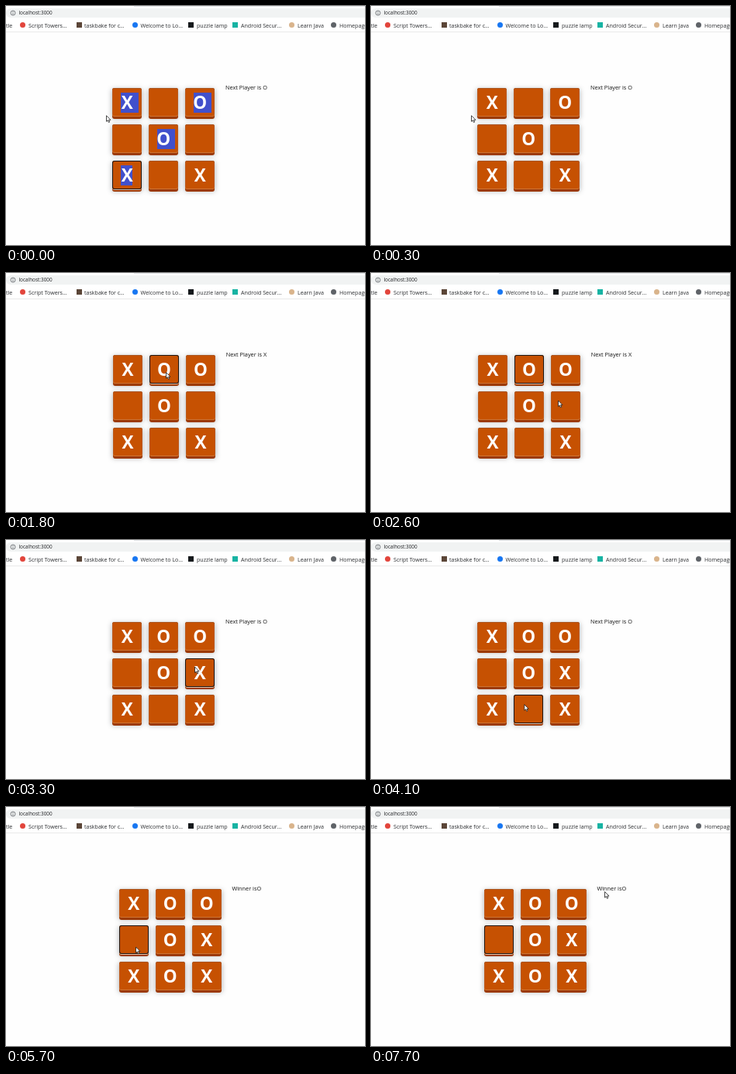
An HTML page for the animation above (8 s loop, 463 by 309 pixels).

```html
<!DOCTYPE html>
<html lang="en">
<head>
<meta charset="utf-8">
<title>Tic-tac-toe</title>
<style>
html, body { margin: 0; width: 100%; height: 100%; overflow: hidden; background: #fefefe; }
body { position: relative; font: 500 7.1px/10px "Open Sans", "Noto Sans", sans-serif; color: #2c2e31; }
body *, body { box-sizing: border-box; }
body div, body span, body i, svg { position: absolute; white-space: pre; }
#chrome { left: 0; top: 0; width: 463px; height: 34px; background: #fff; border-bottom: 1px solid #e9e9e9; overflow: hidden; }
#tabs { left: 165px; top: 0; width: 298px; height: 1px; background: #e2e4e7; }
#address { left: 0; top: 3px; width: 470px; height: 12px; border-radius: 6px 0 0 6px; background: #f1f3f3; }
#address span { left: 16.5px; top: 1.4px; font-size: 6.4px; color: #202124; }
#address svg { left: 5px; top: 2px; }
#chrome > span { top: 19.5px; }
#chrome > i { top: 21px; width: 7px; height: 7px; }
.tile {
  width: 38px; height: 37px; border-radius: 3px; background: #c65102;
  font: 700 22.5px/37px "Open Sans", "Noto Sans", sans-serif; color: #fff; text-align: center;
  --glow: 0 3px #9c3a08, 0 2px 6px 1px rgba(70, 75, 80, .36);
  box-shadow: inset 0 1px #a9541f, inset 0 -1px #cf7434, inset 0 0 0 1px #bb591a, var(--glow);
}
.tile.focus { box-shadow: inset 0 0 0 1px #1d1611, 0 1px #e3bfa8, var(--glow); }
.tile i { left: 11px; top: 6px; height: 26px; background: #4150cc; }
.tile span { left: 0; width: 100%; }
#status { left: 283px; top: 100px; font-size: 7.35px; color: #111; }
</style>
</head>
<body>
<div id="chrome">
  <div id="tabs"></div>
  <div id="address">
    <svg width="8" height="8" fill="none" stroke="#5f6368" stroke-width=".8"><circle cx="4" cy="4" r="3"/><path d="M4 2v.9M4 3.5v2.4"/></svg>
    <span>localhost:3000</span>
  </div>
</div>
<div id="board"><div id="status"></div></div>
<svg id="cursor" width="9" height="12" viewBox="-1 -1 9 12" style="left:-1px;top:-1px">
  <path d="M0 0V7.6L1.8 6.1L3 8.8L4.3 8.2L3.1 5.6H5.5Z" fill="#fff" stroke="#1c1c1c" stroke-width=".8" stroke-linejoin="round"/>
</svg>
<script>
const $ = id => document.getElementById(id);
const add = (parent, tag, style, text = '') => {
  const el = parent.appendChild(document.createElement(tag));
  el.style.cssText = style;
  el.textContent = text;
  return el;
};

// Bookmarks: text x, label, icon x, icon colour, icon corner radius
[
  [0, 'tle'],
  [29, 'Script Towers…', 18, '#e2453c', 4],
  [101, 'taskbake for c…', 91, '#5b4638', 0],
  [173.5, 'Welcome to Lo…', 163, '#1877f2', 4],
  [246, 'puzzle lamp', 235, '#15191c', 0],
  [303, 'Android Secur…', 292, '#17b3a3', 0],
  [376, 'Learn Java', 365, '#d9b48c', 4],
  [430, 'Homepage', 419, '#5f6368', 4],
].forEach(([x, label, iconX, color, r]) => {
  add($('chrome'), 'span', `left:${x}px`, label);
  if (color) add($('chrome'), 'i', `left:${iconX}px;background:${color};border-radius:${r}px`);
});

const tiles = [...Array(9).keys()].map(i => {
  const el = add($('board'), 'div', `left:${137.3 + i % 3 * 47}px;top:${106 + (i / 3 | 0) * 46.8}px`);
  const mark = add(el, 'i', `width:${i == 6 ? 15 : 23}px`);
  return { el, mark, label: add(el, 'span', '') };
});

// Game states: start time, marks, focused tile, status, board shift
const states = [
  [0, 'X O O X X', 6, 'Next Player is O', 0],
  [300, 'X O O X X', -1, 'Next Player is O', 0],
  [1700, 'X O O X X', 1, 'Next Player is O', 0],
  [1800, 'XOO O X X', 1, 'Next Player is X', .7],
  [2900, 'XOO O X X', 5, 'Next Player is X', .7],
  [3000, 'XOO OXX X', 5, 'Next Player is O', 0],
  [4100, 'XOO OXX X', 7, 'Next Player is O', 0],
  [4200, 'XOO OXXOX', 7, 'Winner isO', 8.4],
  [5700, 'XOO OXXOX', 3, 'Winner isO', 8.4],
];

// Cursor moves: start time, steps of 100 ms, target x, target y
const moves = [
  [1000, 4, 206.5, 128.5],
  [2200, 5, 241.5, 165],
  [3300, 1, 243.5, 164],
  [3400, 4, 197.8, 212.7],
  [4700, 5, 167.5, 181],
  [7400, 1, 178, 172],
  [7500, 2, 307, 108],
  [7700, 1, 301.5, 109.5],
];

function cursorAt(t) {
  let x = 129.5, y = 141.7;
  for (const [start, steps, tx, ty] of moves) {
    if (t < start) break;
    const p = Math.min(1, (Math.floor((t - start) / 100) + 1) / steps);
    const k = p * p * (3 - 2 * p);
    x += (tx - x) * k;
    y += (ty - y) * k;
  }
  return [x, y];
}

function draw(t) {
  const [, marks, focus, status, shift] = states.findLast(s => t >= s[0]);
  tiles.forEach(({ el, mark, label }, i) => {
    const selected = t < 300 && marks[i] != ' ' && i < 8;
    el.className = i == focus ? 'tile focus' : 'tile';
    label.textContent = marks[i];
    mark.style.display = selected ? 'block' : 'none';
  });
  $('status').textContent = status;
  $('board').style.left = shift + 'px';
  const [x, y] = cursorAt(t);
  $('cursor').style.transform = `translate(${x}px,${y}px)`;
}

const began = performance.now();
function tick() {
  draw((performance.now() - began) % 8000);
  requestAnimationFrame(tick);
}
tick();
</script>
</body>
</html>
```
